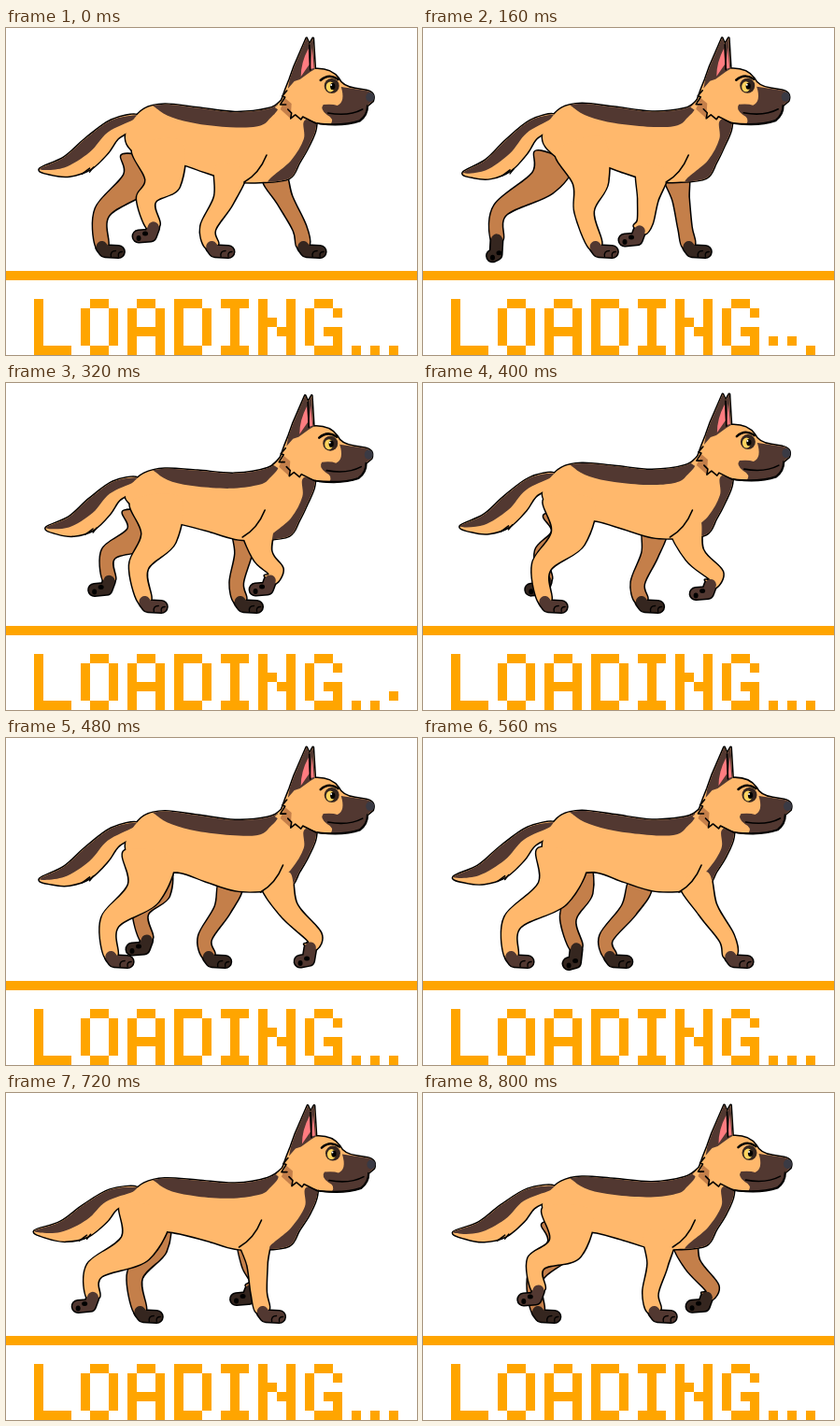
An HTML page with a canvas that plays this animation: 440 px wide and 350 px high, repeating every 880 ms.

```html
<!DOCTYPE html>
<html lang="en">
<head>
<meta charset="utf-8">
<title>Loading</title>
<style>
  html, body { margin: 0; width: 440px; height: 350px; overflow: hidden; background: #fff; }
  canvas { display: block; }
</style>
</head>
<body>
<canvas id="stage" width="440" height="350" role="img" aria-label="LOADING..."></canvas>
<script>
const ctx = document.getElementById('stage').getContext('2d');
const TAN = '#ffb86c', SHADE = '#c47f4a', DARK = '#523831', FAR_PAW = '#35261f', ORANGE = '#ffa500';
const STEP = 80, STEPS = 11, GROUND = 233;

// How the joints of a leg follow its ankle.
const hind = {
  follow: .2, bend: .45, knee: 7, kneeY: 166,
  hock: (x, y, curl) => [x - .15 * (x - 105), y - 36 + 8 * curl]
};
const front = {
  follow: .45, bend: .66, knee: 0, kneeY: 184,
  hock: (x, y, curl) => [x - 4 + 10 * curl, y - 19 + 10 * curl]
};

// A paw lands at `reach` on step `plant`, slides to `push` during `stance` steps, then swings back.
const farLegs = [
  { kind: hind, hip: [155, 140], reach: 168, push: 76, plant: 7.8, stance: 4.5, widths: [40, 30, 16, 13] },
  { kind: front, hip: [260, 157], reach: 320, push: 200, plant: 10.9, stance: 7.1, widths: [24, 17, 14, 13] }
];
const nearLegs = [
  { kind: hind, hip: [163, 124], reach: 190, push: 78, plant: 1.7, stance: 6.2, widths: [52, 37, 20, 14] },
  { kind: front, hip: [258, 150], reach: 332, push: 212, plant: 6.9, stance: 4.4, widths: [32, 21, 16, 14] }
];

const headShape = new Path2D('M286 84L293 78L298 64L302 54L307 40L320 10L323 17L327 10L329 43Q346 42 354 53Q358 62 372 64L384 66Q394 68 391 77L385 82Q385 92 377 98Q360 104 335 101L316 96L304 96Z');
const earShape = new Path2D('M300 64L302 54L307 40L320 10L323 17L327 10L329 43L324 46L313 54L307 56Z');
const earInner = new Path2D('M322 21L323 38L314 51Q314 36 322 21ZM326 20L328 42L324 43Z');
const ruff = new Path2D('M297 74L304 80L303 96L292 86Z');
const muzzle = new Path2D('M357 62L384 66Q394 68 391 77L385 82Q385 92 377 98Q360 104 346 102Q350 96 342 92Q334 86 338 81Q348 80 353 82Q362 78 357 62Z');
const faceLines = new Path2D('M323 17L324 44M343 90Q365 94 380 86M299 66L294 72L297 73L292 81L298 81M300 86L304 90L303 96L308 92L314 97L316 94L330 101Q360 104 377 98Q385 92 385 82');
const brow = new Path2D('M335 55Q344 47 354 54');

const mix = (a, b, k) => a + (b - a) * k;
const smooth = s => s * s * (3 - 2 * s);

// Closed smooth curve through points.
function spline(pts) {
  const path = new Path2D(), n = pts.length;
  path.moveTo(...pts[0]);
  for (let i = 0; i < n; i++) {
    const [a, b, c, d] = [n - 1, 0, 1, 2].map(k => pts[(i + k) % n]);
    path.bezierCurveTo(b[0] + (c[0] - a[0]) / 6, b[1] + (c[1] - a[1]) / 6,
      c[0] - (d[0] - b[0]) / 6, c[1] - (d[1] - b[1]) / 6, c[0], c[1]);
  }
  return path;
}

// Smooth tapered limb around its joints.
function tube(joints, widths) {
  const left = [], right = [], last = joints.length - 1;
  joints.forEach(([x, y], i) => {
    const a = joints[Math.max(i - 1, 0)], b = joints[Math.min(i + 1, last)];
    const dx = b[0] - a[0], dy = b[1] - a[1], k = widths[i] / 2 / Math.hypot(dx, dy);
    left.push([x + dy * k, y - dx * k]);
    right.unshift([x - dy * k, y + dx * k]);
  });
  return spline([...left, ...right]);
}

function poseLeg({ kind, hip, reach, push, plant, stance, widths }, step) {
  const since = (step - plant + STEPS) % STEPS;
  const swing = Math.max(0, (since - stance) / (STEPS - stance));
  const raise = Math.sin(Math.PI * swing), curl = Math.min(1, 2 * raise);
  const x = swing ? mix(push, reach, smooth(swing)) : mix(reach, push, since / stance);
  const y = GROUND - 23 * raise;
  const shoulder = [mix(hip[0], x, kind.follow), hip[1]];
  const knee = [mix(hip[0], x, kind.bend) + kind.knee, kind.kneeY];
  const limb = tube([shoulder, knee, kind.hock(x, y, curl), [x, y]], widths);

  const angle = .35 + 2.2 * curl, dx = 19 * Math.cos(angle), dy = 19 * Math.sin(angle);
  const toe = [x + dx, y + dy];
  const paw = new Path2D(`M${x} ${y + 1}L${x + dx * .2} ${y + dy * .9}L${toe}`);
  return { limb, paw, toe, shoulder, x, flat: curl < .5 };
}

function stroke(path, width, color = '#000') {
  ctx.lineWidth = width;
  ctx.strokeStyle = color;
  ctx.stroke(path);
}

function fill(path, color) {
  ctx.fillStyle = color;
  ctx.fill(path);
}

function oval(x, y, rx, ry, color) {
  const path = new Path2D();
  path.ellipse(x, y, rx, ry, 0, 0, 7);
  fill(path, color);
}

function shifted(x, y, draw) {
  ctx.save();
  ctx.translate(x, y);
  draw();
  ctx.restore();
}

function within(path, draw) {
  ctx.save();
  ctx.clip(path);
  draw();
  ctx.restore();
}

function outlineLeg(leg) {
  stroke(leg.limb, 3);
  stroke(leg.paw, 15);
}

function fillLeg(leg, skin, pawColor) {
  fill(leg.limb, skin);
  stroke(leg.paw, 12, pawColor);
  const [x, y] = leg.toe;
  if (leg.flat) {
    stroke(new Path2D(`M${x - 8} ${y + 5}q-1 -6 5 -6M${x} ${y + 5}q-1 -5 4 -5`), 1.3);
  } else {
    oval(x, y + 2, 2.5, 3, '#000');
    oval(x + 7, y - 3, 3, 2.5, '#000');
  }
}

function drawHead() {
  fill(headShape, TAN);
  fill(ruff, SHADE);
  fill(earShape, DARK);
  fill(earInner, '#ff7c80');
  fill(muzzle, DARK);
  oval(347, 61, 8, 8, FAR_PAW);
  oval(345.5, 62, 4.5, 5.5, '#ffd45e');
  oval(348, 61.5, 2.6, 3.6, '#000');
  oval(346.5, 60, 1, 1, '#fff');
  oval(388, 73, 4.5, 5, '#3a3a44');
  stroke(faceLines, 1.6);
  stroke(brow, 2.5);
}

function drawDog(step) {
  // Two bounces and one slow sway in each loop.
  const bounce = Math.cos(4 * Math.PI * (step - 3.8) / STEPS);
  const sway = Math.cos(2 * Math.PI * (step - 3) / STEPS);
  const r = 5.5 + 7.5 * bounce, m = 6 + 5 * bounce, h = 1.7 + 2 * bounce;
  const hx = 1.5 - 1.5 * sway;
  const rm = (r + m) / 2, mh = (m + h) / 2;

  const far = farLegs.map(leg => poseLeg(leg, step));
  const near = nearLegs.map(leg => poseLeg(leg, step));

  const torso = spline([
    [128, 116 + r * .4], [133, 101 + r * .7], [148, 84 + r], [170, 79 + r], [205, 82 + rm],
    [245, 86 + m], [280, 84 + mh], [293 + hx, 77 + h], [304 + hx, 62 + h], [328 + hx, 84 + h],
    [330 + hx, 106 + h], [322 + hx, 126 + h], [314, 143 + h], [303, 160 + h], [272, 164 + h],
    [245, 163 + h], [215, 154 + r * .3], [186, 144 + r * .5], [155, 144], [134, 130]]);
  const saddle = spline([
    [158, 74 + r], [162, 84 + r], [178, 93 + r], [205, 99 + rm], [240, 102 + m],
    [268, 103 + m * .6], [281, 96 + mh], [288, 78 + mh], [220, 68 + m]]);
  const throat = spline([
    [318 + hx, 98 + h], [317 + hx, 118 + h], [305, 141 + h], [280, 165 + h],
    [308, 172 + h], [335, 130 + h], [340 + hx, 96 + h]]);

  // The tail follows its tip more the further a point lies from the rump.
  const trail = ([x, y]) => {
    const w = Math.min(1, (140 - x) / 108);
    return [x + (4 + 7 * sway) * w, y + (4.5 + 4 * sway) * w + r * (1 - w) * .8];
  };
  const top = [[140, 91], [112, 96], [84, 115], [60, 135], [33, 147]];
  const tail = spline([...top, [46, 153], [66, 155], [89, 148], [108, 131], [119, 116], [134, 106]].map(trail));
  const stripe = spline([...top, [60, 146], [88, 130], [108, 109], [136, 96]].map(trail));

  for (const leg of far) {
    outlineLeg(leg);
    fillLeg(leg, SHADE, FAR_PAW);
  }

  // Outlines first, fills after, so joined parts share one contour.
  stroke(tail, 3);
  stroke(torso, 3);
  near.forEach(outlineLeg);
  shifted(hx, h, () => stroke(headShape, 3));

  fill(tail, TAN);
  within(tail, () => fill(stripe, DARK));
  const [fx, fy] = trail([84, 151]);
  stroke(new Path2D(`M${fx - 4} ${fy + 2}l8 -6M${fx + 4} ${fy}l4 -5`), 1.5);
  fill(torso, TAN);
  within(torso, () => {
    fill(saddle, DARK);
    fill(throat, DARK);
  });
  near.forEach(leg => fillLeg(leg, TAN, DARK));

  // The shoulder fold sits on the side the leg swings away from.
  const { shoulder, x } = near[1];
  const fold = shoulder[0] + (x < 250 ? 14 : -16);
  stroke(new Path2D(`M${fold + 24} 136Q${fold + 16} 156 ${fold} 165`), 1.6);
  shifted(hx, h, drawHead);
}

const glyphs = {
  L: 'X... X... X... X... X... XXXX',
  O: '.XX. X..X X..X X..X X..X .XX.',
  A: '.XX. X..X X..X XXXX X..X X..X',
  D: 'XXX. X..X X..X X..X X..X XXX.',
  I: 'XXX .X. .X. .X. .X. XXX',
  N: 'X..X X..X XX.X X.XX X..X X..X',
  G: '.XX. X..X X... X.XX X..X .XXX'
};

function drawLabel(step) {
  ctx.fillStyle = ORANGE;
  ctx.fillRect(0, 260, 440, 10);
  let x = 30;
  for (const letter of 'LOADING') {
    const rows = glyphs[letter].split(' ');
    rows.forEach((row, j) => [...row].forEach((cell, i) => {
      if (cell === 'X') ctx.fillRect(x + i * 10, 290 + j * 10, 10, 10);
    }));
    x += rows[0].length * 10 + 10;
  }
  for (let i = 0; i < 3; i++) {
    const raised = step === i + 1 || step === i + 2;
    ctx.fillRect(370 + i * 20, raised ? 330 : 340, 10, 10);
  }
}

function render(now) {
  const step = Math.floor(now / STEP) % STEPS;
  ctx.fillStyle = '#fff';
  ctx.fillRect(0, 0, 440, 350);
  drawDog(step);
  drawLabel(step);
}

ctx.lineCap = ctx.lineJoin = 'round';
const start = performance.now();
function tick() {
  render(performance.now() - start);
  requestAnimationFrame(tick);
}
tick();
</script>
</body>
</html>
```
